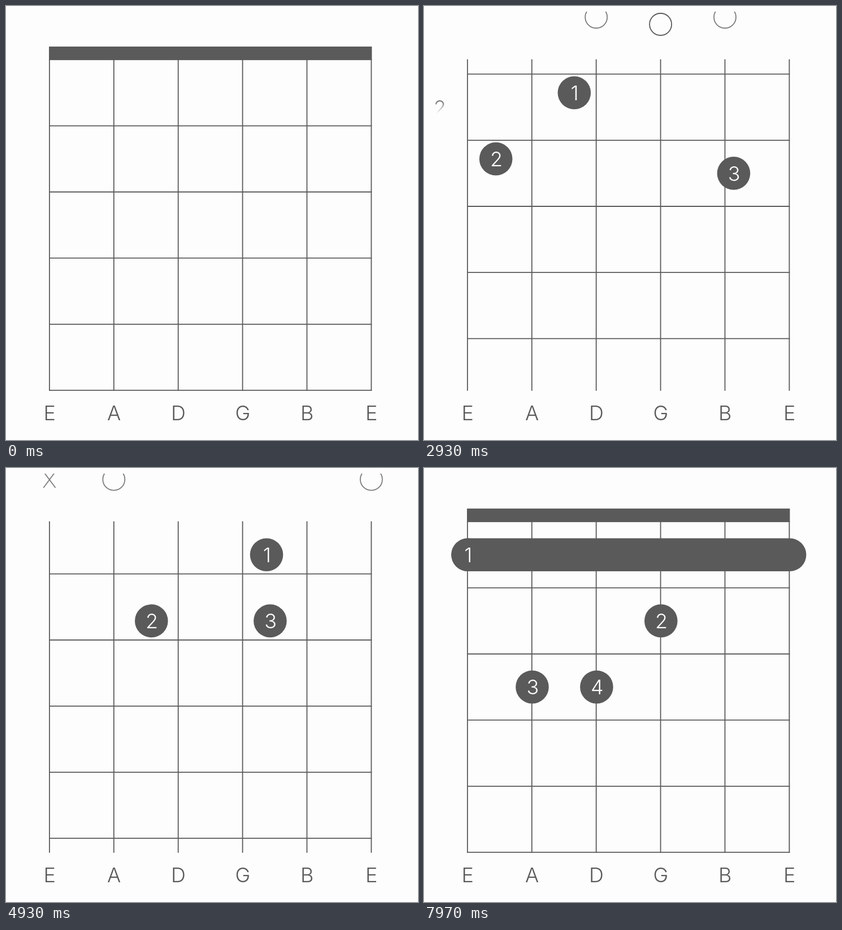
Animation, 729 px wide and 769 px high, one loop 8000 ms. Source, as an HTML page:

```html
<!DOCTYPE html>
<html lang="en">
<head>
<meta charset="utf-8">
<title>Chord diagram</title>
<style>
html, body { margin: 0; width: 100%; height: 100%; overflow: hidden; background: #fdfdfd; }
svg { display: block; width: 100%; height: 100%; }
text { font: 300 36px Inter, "Open Sans", sans-serif; text-anchor: middle; fill: #5a5a5a; }
.finger text { fill: #fdfdfd; }
.line { fill: none; stroke: #5a5a5a; stroke-width: 1.8; }
.solid { fill: #5a5a5a; }
</style>
</head>
<body>
<svg id="stage" viewBox="0 0 729 769">
  <defs>
    <clipPath id="boardClip"><rect y="71.5" width="729" height="610.7"/></clipPath>
    <clipPath id="markClip"><rect y="10" width="729" height="62"/></clipPath>
    <linearGradient id="fade" gradientUnits="userSpaceOnUse" x1="0" y1="170" x2="0" y2="190">
      <stop offset="0" stop-color="#fff"/><stop offset="1" stop-color="#000"/>
    </linearGradient>
    <mask id="labelMask" maskUnits="userSpaceOnUse" x="0" y="0" width="729" height="769">
      <rect y="95" width="60" height="120" fill="url(#fade)"/>
    </mask>
  </defs>
  <rect width="729" height="769" fill="#fdfdfd"/>
  <g id="strings" clip-path="url(#boardClip)"></g>
  <g clip-path="url(#boardClip)"><g id="frets"></g></g>
  <g id="marks" clip-path="url(#markClip)"></g>
  <g mask="url(#labelMask)"><text id="label" x="28">2</text></g>
  <g id="names"></g>
  <rect id="bar" class="solid" rx="29.3" height="58.6"/>
  <g id="fingers"></g>
</svg>
<script>
const LOOP = 8000, MOVE = 1000;
const LEFT = 76.9, TOP = 95.2, COL = 113.9, ROW = 117.15, R = 29.3, EDGE = 729;
const RISE = 250, DECAY = 200, STAGGER = 40, STRUM = 1097;

// Fingers are [string, row]; marks: x = muted, o = open.
const chords = [
  { fingers: [], marks: '      ', pos: 1 },
  { fingers: [[4, 0], [2, 1], [1, 2]], marks: 'x  o o', pos: 1 },
  { fingers: [[1, 0], [0, 1], [5, 1]], marks: '  ooo ', pos: 2 },
  { fingers: [[4, 0], [2, 1], [3, 1]], marks: 'xo   o', pos: 1 },
  { fingers: [[0, 0], [3, 1], [1, 2], [2, 2]], marks: '      ', pos: 1, bar: 5 }
];
// Each move becomes visible a little after its clock starts.
const moves = [
  { start: 220, shown: 430 },
  { start: 2240, shown: 2370 },
  { start: 4235, shown: 4330 },
  { start: 6246, shown: 6370 }
];

const $ = id => document.getElementById(id);
const clamp = v => Math.min(1, Math.max(0, v));
const mix = (a, b, p) => a + (b - a) * p;
const ease = x => (1 - Math.cos(Math.PI * clamp(x))) / 2;
const stringX = i => LEFT + COL * i;
const rowY = r => TOP + ROW * (r + 0.5);

function add(parent, tag, attrs, text) {
  const el = document.createElementNS('http://www.w3.org/2000/svg', tag);
  set(el, attrs);
  if (text) el.textContent = text;
  parent.appendChild(el);
  return el;
}
function set(el, attrs) {
  for (const k in attrs) el.setAttribute(k, attrs[k]);
}

const strings = [], marks = [], fingers = [];
[...'EADGBE'].forEach((name, i) => {
  const x = stringX(i);
  strings.push(add($('strings'), 'line', {
    class: 'line', x1: x, x2: x, y1: TOP, y2: 681, 'stroke-linecap': 'round'
  }));
  add($('names'), 'text', { x: x + 0.3, y: 733.7 }, name);
  marks.push({
    x: add($('marks'), 'path', { class: 'line', d: `M${x - 10.6} 18.8l21.2 28.6m0-28.6l-21.2 28.6` }),
    o: add($('marks'), 'circle', { class: 'line', cx: x, cy: 32.5, r: 19.5 })
  });
});
add($('frets'), 'rect', { class: 'solid', x: 76, y: 71.7, width: 571.4, height: 24.2 });
for (let k = 1; k < 8; k++) {
  const y = TOP + ROW * k;
  add($('frets'), 'line', { class: 'line', x1: 76, x2: 647.3, y1: y, y2: y });
}
for (let i = 0; i < 4; i++) {
  const g = add($('fingers'), 'g', { class: 'finger' });
  add(g, 'circle', { class: 'solid', r: R });
  add(g, 'text', { x: 0.8, y: 13.2 }, String(i + 1));
  fingers.push(g);
}

// Absent fingers wait at the right edge, each in its own row.
function fingerAt(chord, i) {
  const f = chord.fingers[i];
  return f ? { x: stringX(f[0]) + 0.7, y: rowY(f[1]), a: 1 } : { x: EDGE, y: rowY(i), a: 0 };
}

function pluck(time) {
  if (time < 0) return 0;
  if (time < RISE) return 1 - (1 - time / RISE) ** 2;
  return (1 - clamp((time - RISE) / DECAY)) ** 2;
}

function draw(t) {
  let n = 0;
  while (n < moves.length && t >= moves[n].shown) n++;
  const to = chords[n], from = chords[Math.max(0, n - 1)];
  const since = n ? t - moves[n - 1].start : 0;
  const p = n ? ease(since / MOVE) : 1;

  strings.forEach((s, i) => {
    const swing = n && to.marks[i] !== 'x' ? pluck(since - STRUM - STAGGER * i) : 0;
    s.style.strokeWidth = 1.8 + 5 * swing;
  });

  marks.forEach((m, i) => {
    for (const kind of ['x', 'o']) {
      const a = mix(+(from.marks[i] === kind), +(to.marks[i] === kind), p);
      set(m[kind], { opacity: a, transform: `translate(0 ${(a - 1) * ROW / 2})` });
    }
  });

  const shift = mix(from.pos, to.pos, p) - 1;
  set($('frets'), { transform: `translate(0 ${-shift * ROW})` });
  set($('label'), { y: 167.3 + (1 - shift) * ROW, opacity: shift });

  const spots = fingers.map((g, i) => {
    const a = fingerAt(from, i), b = fingerAt(to, i);
    const x = mix(a.x, b.x, p), y = mix(a.y, b.y, p);
    set(g, { transform: `translate(${x} ${y})`, opacity: mix(a.a, b.a, p) });
    return { x, y };
  });

  const span = mix(from.bar || 0, to.bar || 0, p) * COL;
  set($('bar'), {
    x: spots[0].x - R, y: spots[0].y - R, width: span + 2 * R,
    opacity: mix(from.bar ? 1 : 0, to.bar ? 1 : 0, p)
  });
}

const begin = performance.now();
function tick() {
  draw((performance.now() - begin) % LOOP);
  requestAnimationFrame(tick);
}
tick();
</script>
</body>
</html>
```
